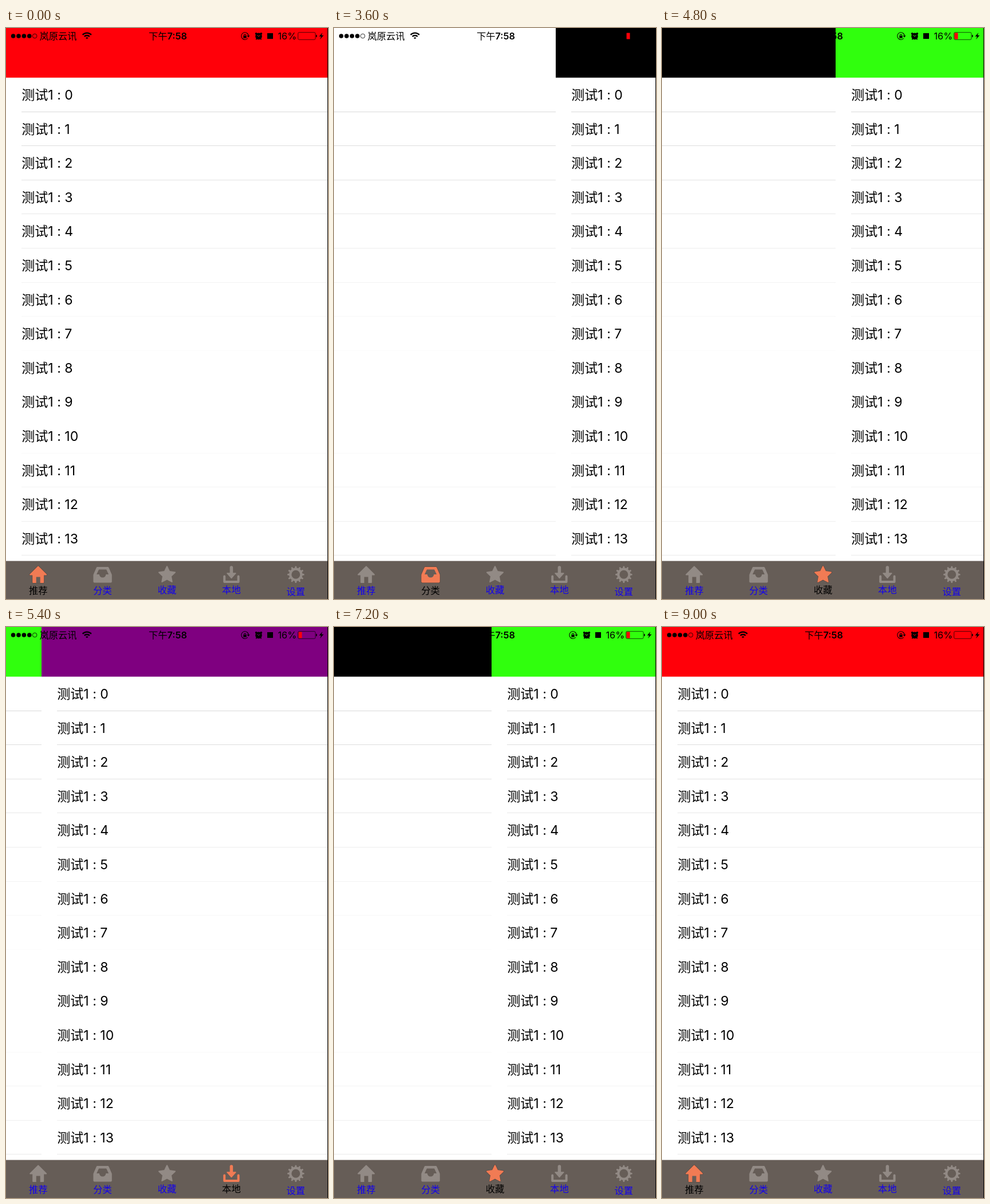
Animation, 562 px wide and 997 px high, one loop 9.6 s. Source, as an HTML page with a canvas:

```html
<!DOCTYPE html>
<html lang="zh-CN">
<head>
<meta charset="utf-8">
<title>Paged tabs</title>
<style>
html, body { margin: 0; width: 100%; height: 100%; overflow: hidden; background: #fff; }
canvas { display: block; width: 562px; height: 997px; }
</style>
</head>
<body>
<canvas id="stage"></canvas>
<script>
const W = 562, H = 997, LOOP = 9600, STEP = 200;
const HEADER = 86.7, ROW = 59.6, INSET = 27.15, TAB_TOP = 930.6;
const FONT = 'Inter, "Noto Sans CJK SC", "Noto Sans CJK", sans-serif';
const COLORS = ['#ff0009', '#ffffff', '#000000', '#30ff0d', '#7f0080'];
const BAR = '#665d57', GRAY = '#928a85', ORANGE = '#f17b54', BLUE = '#1200ee';

// each swipe eases out to a page; some flash the scroll indicator on arrival
const SWIPES = [
  { at: 2715, ms: 485, to: 1 },
  { at: 3500, ms: 600, to: 2.02, flash: 0.05 },
  { at: 4300, ms: 100, to: 2 },
  { at: 4700, ms: 376, to: 3 },
  { at: 5076, ms: 485, to: 4, flash: 0.38 },
  { at: 6300, ms: 300, to: 3 },
  { at: 7100, ms: 350, to: 2 },
  { at: 7450, ms: 350, to: 1.082, flash: 0.38 },
  { at: 8100, ms: 900, to: 0 }
];

const canvas = document.getElementById('stage');
const ctx = canvas.getContext('2d');
const dpr = window.devicePixelRatio || 1;
canvas.width = W * dpr;
canvas.height = H * dpr;

const easeOut = u => 1 - (1 - u) ** 2;

function scrollAt(t) {
  let pos = 0, flash = 0;
  for (const s of SWIPES) {
    if (t < s.at) break;
    const age = t - s.at - s.ms;
    pos += (s.to - pos) * easeOut(Math.min(1, 1 + age / s.ms));
    flash = age >= 0 && age < 400 ? s.flash || 0 : 0;
  }
  return { pos, flash };
}

function rect(x, y, w, h, color) {
  ctx.fillStyle = color;
  ctx.fillRect(x, y, w, h);
}

function text(str, x, y, size, color = '#000', align = 'left', weight = 400) {
  ctx.font = `${weight} ${size}px ${FONT}`;
  ctx.textAlign = align;
  ctx.fillStyle = color;
  ctx.fillText(str, x, y);
}

function poly(...pts) {
  ctx.beginPath();
  for (let i = 0; i < pts.length; i += 2) ctx.lineTo(pts[i], pts[i + 1]);
  ctx.closePath();
}

function arc(x, y, r, from = 0, to = Math.PI * 2) {
  ctx.beginPath();
  ctx.arc(x, y, r, from, to);
}

function disc(x, y, r) {
  arc(x, y, r);
  ctx.fill();
}

function line(width, ...pts) {
  ctx.lineWidth = width;
  ctx.beginPath();
  for (let i = 0; i < pts.length; i += 2) ctx.lineTo(pts[i], pts[i + 1]);
  ctx.stroke();
}

function page(index, x, flash) {
  rect(x, 0, W, H, '#fff');
  rect(x, 0, W, HEADER, COLORS[index]);
  for (let k = 0; k < 14; k++) {
    const top = HEADER + ROW * k;
    text(`测试1 : ${k}`, x + INSET, top + 38.2, 23.1);
    // hairlines fade where they fall between pixels
    const v = 255 - Math.max(0, 5 * Math.abs(k - 8.2) - 3);
    rect(x + 27, Math.floor(top + ROW - 0.25), W - 27, 1, `rgb(${v},${v},${v})`);
  }
  if (flash) {
    ctx.fillStyle = `rgba(0,0,0,${flash})`;
    ctx.beginPath();
    ctx.roundRect(x + 554.6, 4, 3.4, 733, 1.7);
    ctx.fill();
  }
}

function statusBar(pos) {
  const ink = '#000';
  ctx.fillStyle = ctx.strokeStyle = ink;
  ctx.lineWidth = 0.8;
  for (let i = 0; i < 5; i++) {
    arc(12.6 + 9.4 * i, 14, 3.8);
    i < 4 ? ctx.fill() : ctx.stroke();
  }
  text('岚原云讯', 58.5, 20, 16.3);

  // signal fan
  ctx.lineWidth = 2.3;
  for (const r of [2, 6.5, 10.8]) {
    arc(141.3, 19.5, r, -Math.PI * 0.75, -Math.PI * 0.25);
    ctx.stroke();
  }

  text('下午', 249, 20, 16.3, ink, 'left', 500);
  text('7:58', 281.5, 20, 16.3, ink, 'left', 600);

  // rotation lock
  ctx.lineWidth = 1.1;
  arc(417, 14, 6.2, 0.7, Math.PI * 2 - 0.1);
  ctx.stroke();
  arc(417, 13, 1.8, Math.PI, 0);
  ctx.stroke();
  ctx.fillRect(414.3, 13.4, 5.4, 4.2);
  poly(420.5, 13.2, 425.6, 13.2, 423, 16.4);
  ctx.fill();

  // alarm clock, its hands showing the page below
  disc(441, 14.4, 5.8);
  for (const side of [-1, 1]) {
    disc(441 + side * 4.3, 9.8, 1.9);
    line(1.6, 441 + side * 3, 18, 441 + side * 4.6, 20.2);
  }
  ctx.strokeStyle = COLORS[Math.floor(pos + 441 / W)];
  line(1, 438.3, 12.4, 441, 14.8, 443.6, 12.4);

  rect(456, 9, 10, 10, ink);
  text('16%', 474.5, 20, 16.3);

  // battery
  rect(510.5, 8.5, 6, 11, COLORS[0]);
  ctx.strokeStyle = ink;
  ctx.lineWidth = 0.7;
  ctx.beginPath();
  ctx.roundRect(509.7, 7.7, 30.3, 12.6, 2);
  ctx.stroke();
  rect(541, 12, 1.6, 4, ink);
  poly(552.3, 8, 546.5, 14.8, 550, 14.8, 548, 20, 554.4, 12.8, 550.7, 12.8);
  ctx.fill();
}

// fills the current path with rounded corners; active icons get a soft rim
function solid(radius, active) {
  if (active) {
    ctx.save();
    ctx.strokeStyle = 'rgba(70,50,42,0.5)';
    ctx.lineWidth = radius * 2 + 1.4;
    ctx.stroke();
    ctx.restore();
  }
  ctx.lineWidth = radius * 2;
  ctx.fill();
  ctx.stroke();
}

function home(x, active) {
  poly(x, 940.5, x + 14, 954.5, x + 9, 954.5, x + 9, 968, x - 9, 968, x - 9, 954.5, x - 14, 954.5);
  solid(1, active);
  rect(x - 3.5, 958.5, 7, 11, BAR);
}

function tray(x, active) {
  poly(x - 9, 943, x + 9, 943, x + 14.2, 955, x + 14.2, 966.5, x - 14.2, 966.5, x - 14.2, 955);
  solid(2, active);
  ctx.fillStyle = BAR;
  poly(x - 6.5, 945.5, x + 6.5, 945.5, x + 10.5, 954, x - 10.5, 954);
  ctx.fill();
  arc(x, 953.8, 5.8, 0, Math.PI);
  ctx.fill();
}

function star(x, active) {
  const pts = [];
  for (let i = 0; i < 10; i++) {
    const r = i % 2 ? 7.3 : 14.8, a = Math.PI * (i / 5 - 0.5);
    pts.push(x + r * Math.cos(a), 955 + r * Math.sin(a));
  }
  poly(...pts);
  solid(1, active);
}

function download(x, active) {
  line(4, x - 12.2, 957.5, x - 12.2, 967, x + 12.2, 967, x + 12.2, 957.5);
  line(5.5, x, 942, x, 953);
  poly(x - 7.5, 952, x + 7.5, 952, x, 960.5);
  solid(0.75, false);
}

function gear(x) {
  const y = 954.3;
  ctx.lineWidth = 4.2;
  arc(x, y, 9.6);
  ctx.stroke();
  for (let i = 0; i < 12; i++) {
    const c = Math.cos(i * Math.PI / 6), s = Math.sin(i * Math.PI / 6);
    line(3, x + 11 * c, y + 11 * s, x + 13.3 * c, y + 13.3 * s);
  }
}

const TABS = [
  ['推荐', 982, home], ['分类', 982, tray], ['收藏', 981, star],
  ['本地', 981, download], ['设置', 984, gear]
];

function tabBar(current) {
  rect(0, TAB_TOP, W, H - TAB_TOP, BAR);
  ctx.save();
  ctx.lineJoin = ctx.lineCap = 'round';
  TABS.forEach(([label, y, icon], i) => {
    const x = W / 5 * (i + 0.5), active = i === current;
    ctx.fillStyle = ctx.strokeStyle = active ? ORANGE : GRAY;
    icon(x, active);
    text(label, x, y + 6, 16.3, active ? '#000' : BLUE, 'center');
  });
  ctx.restore();
}

function draw(t) {
  const { pos, flash } = scrollAt(Math.floor(t / STEP) * STEP);
  ctx.setTransform(dpr, 0, 0, dpr, 0, 0);
  for (let i = 0; i < COLORS.length; i++) {
    const x = Math.round((i - pos) * W);
    if (Math.abs(x) < W) page(i, x, i === Math.round(pos) ? flash : 0);
  }
  statusBar(pos);
  tabBar(Math.floor(pos));
  rect(W - 1, 0, 1, H, '#000');
}

const start = performance.now();
function tick() {
  draw((performance.now() - start) % LOOP);
  requestAnimationFrame(tick);
}
tick();
</script>
</body>
</html>
```
